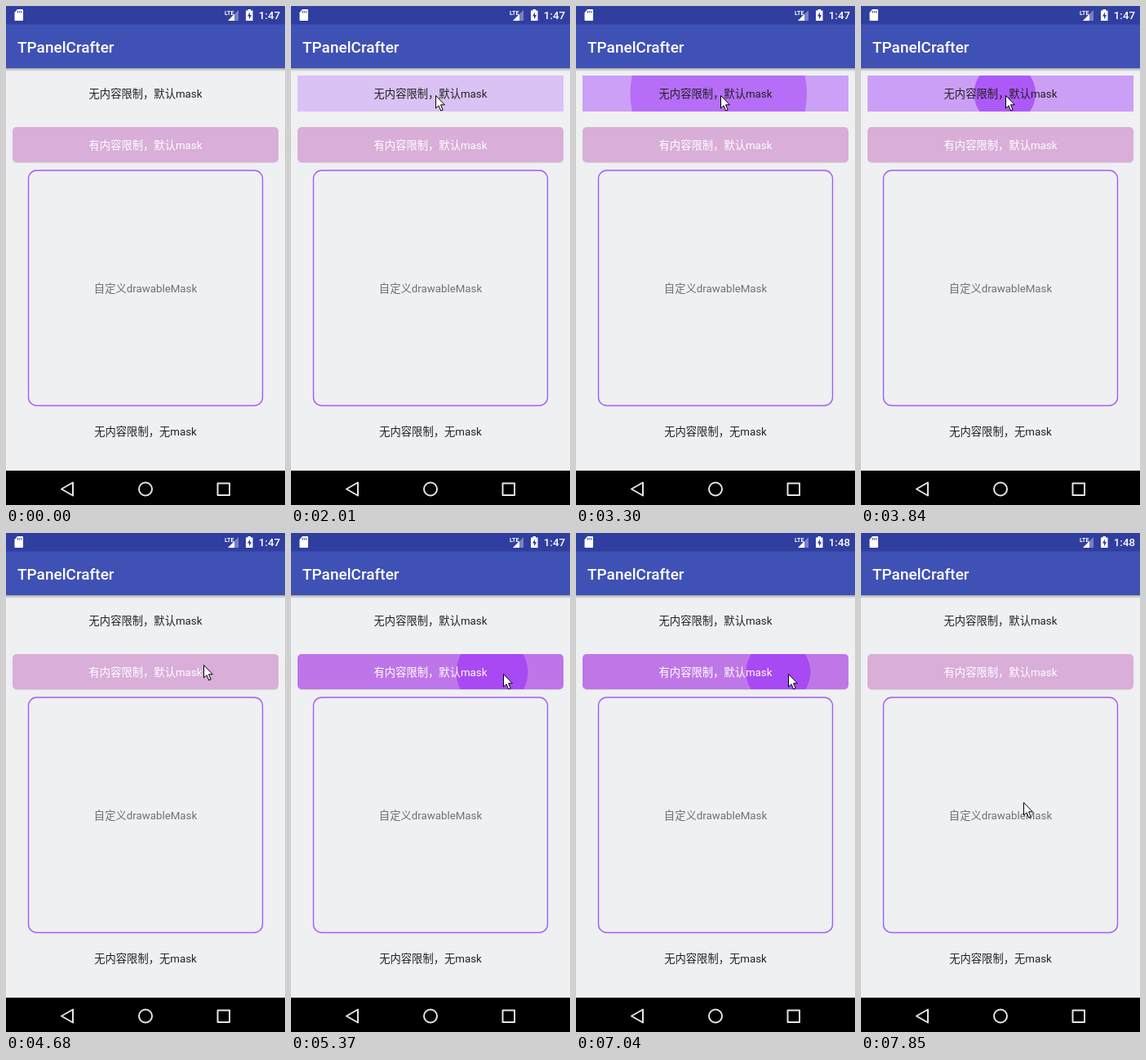
Recreate the animation shown at these times as an HTML page. Size 342x610 px, loop 8000 ms.

```html
<!DOCTYPE html>
<html lang="zh-CN">
<head>
<meta charset="utf-8">
<style>
  html, body { margin: 0; width: 100%; height: 100%; overflow: hidden; background: #eef0f2; }
  svg { display: block; width: 342px; height: 610px; }
  text { font: 13.3px Roboto, "Noto Sans CJK SC", "Noto Sans CJK", sans-serif; }
  .label { text-anchor: middle; fill: #222; }
  .ripple { fill: #9b30fa; }
</style>
</head>
<body>
<svg viewBox="0 0 342 610">
  <defs>
    <linearGradient id="shade" x2="0" y2="1">
      <stop stop-color="#000" stop-opacity=".3"/>
      <stop offset="1" stop-color="#000" stop-opacity="0"/>
    </linearGradient>
    <clipPath id="clip0"><rect x="8" y="85" width="326" height="44"/></clipPath>
    <clipPath id="clip1"><rect x="8" y="148" width="326" height="43" rx="5"/></clipPath>
  </defs>

  <rect width="342" height="610" fill="#eef0f2"/>
  <rect y="76" width="342" height="4" fill="url(#shade)"/>
  <rect y="22" width="342" height="54" fill="#3f51b5"/>
  <rect width="342" height="22.5" fill="#303f9f"/>
  <text x="14" y="57" fill="#fff" style="font-size:19px;font-weight:500">TPanelCrafter</text>

  <!-- status bar -->
  <g fill="#fff">
    <path d="M14 4h6q1 0 1 1v12q0 1-1 1h-8.500q-1 0-1-1V8z"/>
    <path d="M14.500 6v2.500M16.700 6v2.500M18.900 6v2.500" stroke="#303f9f"/>
    <text x="268" y="10.500" style="font-size:7px;font-weight:700" textLength="">LTE</text>
    <path d="M285 5v13h-13z" opacity=".35"/>
    <path d="M280 10v8h-8z"/>
    <path d="M296.500 5.500V4h3.500v1.500h2.500V18h-8.500V5.500z"/>
    <path d="M299 7.500l-3 5h2v4l3-5.500h-2z" fill="#303f9f"/>
    <text id="clock" x="336" y="16" text-anchor="end" style="font-weight:500">1:47</text>
  </g>

  <!-- rows -->
  <g class="ripple" clip-path="url(#clip0)">
    <rect x="8" y="85" width="326" height="44"/><circle cy="107"/>
  </g>
  <text class="label" x="171" y="112">无内容限制，默认mask</text>

  <rect x="8" y="149" width="326" height="43" rx="5" opacity=".1"/>
  <rect x="8" y="148" width="326" height="43" rx="5" fill="#d9aed9"/>
  <g class="ripple" clip-path="url(#clip1)">
    <rect x="8" y="148" width="326" height="43"/><circle cy="170"/>
  </g>
  <text class="label" x="171" y="174.500" style="fill:#fff">有内容限制，默认mask</text>

  <rect x="27.500" y="201" width="287" height="287.500" rx="10" fill="none" stroke="#a55cf5" stroke-width="1.400"/>
  <text class="label" x="171" y="350" style="fill:#6f7072">自定义drawableMask</text>
  <text class="label" x="171" y="525">无内容限制，无mask</text>

  <!-- navigation bar -->
  <rect y="568" width="342" height="42"/>
  <g fill="none" stroke="#e4e4e4" stroke-width="2" stroke-linejoin="round">
    <path d="M82 582.500v16l-14-8z"/>
    <circle cx="171" cy="590.500" r="8"/>
    <rect x="259.500" y="583.500" width="14.500" height="14.500"/>
  </g>

  <path id="cursor" d="M.5 .5V16L4 12.800 6.700 19 9.200 18 6.500 11.800H11.300Z" fill="#fff" stroke="#000"/>
</svg>
<script>
const LOOP = 8000;
// Bursts of screen updates: first tick, last tick, number of ticks
const bursts = [
  [560, 1520, 8], [1890, 2570, 6], [3030, 3540, 5], [3840, 4680, 7],
  [5070, 5800, 6], [6100, 7040, 7], [7190, 7850, 6]
];
const taps = [
  { row: 0, x: 177, down: 1886, up: 2180, visible: 1890 },
  { row: 0, x: 177, down: 2950, up: 3190, visible: 3030 },
  { row: 0, x: 177, down: 3595, up: 3980, visible: 3840 },
  { row: 1, x: 260, down: 5100, up: 5420, visible: 5200 },
  { row: 1, x: 260, down: 5907, up: 6300, visible: 6100 },
  { row: 1, x: 260, down: 6790, up: 7080, visible: 6870 }
];
// Pointer moves: start, end, from, to
const moves = [
  [560, 1520, [330, 573], [177, 109]],
  [4260, 4680, [177, 109], [242, 161]],
  [5000, 5070, [242, 161], [260, 172]],
  [7454, 7850, [260, 172], [199, 329]]
];
const FADE = 350, DELAY = 140, STRENGTH = .62;

const clock = document.getElementById('clock');
const cursor = document.getElementById('cursor');
const ripples = [...document.querySelectorAll('.ripple')];
const clamp = v => Math.min(1, Math.max(0, v));
const ease = p => (1 - Math.cos(Math.PI * p)) / 2;

function snap(t) {
  const burst = bursts.filter(b => t >= b[0]).pop();
  if (!burst) return 0;
  const [start, end, count] = burst;
  const step = (end - start) / (count - 1);
  return Math.min(end, start + Math.floor((t - start + 16) / step) * step);
}

function drawRipple(group, row, t) {
  const tap = taps.find(p => p.row === row && t >= p.visible && t < p.up + FADE);
  group.style.display = tap ? '' : 'none';
  if (!tap) return;
  const age = t - tap.down;
  const released = Math.max(0, t - tap.up);
  const fade = 1 - released / FADE;
  const radius = Math.max(0, age - DELAY) * .36 + released * .4;
  const [back, circle] = group.children;
  back.setAttribute('opacity', STRENGTH * clamp(age / 360) * fade);
  circle.setAttribute('opacity', STRENGTH * fade);
  circle.setAttribute('r', radius);
  circle.setAttribute('cx', tap.x + (171 - tap.x) * clamp(radius / 290));
}

function drawCursor(t) {
  const move = moves.filter(m => t >= m[0]).pop();
  cursor.style.display = move ? '' : 'none';
  if (!move) return;
  const [start, end, from, to] = move;
  const p = ease(clamp((t - start) / (end - start)));
  const [x, y] = from.map((v, i) => Math.round(v + (to[i] - v) * p));
  cursor.setAttribute('transform', `translate(${x} ${y})`);
}

const origin = performance.now();
function draw() {
  const t = snap((performance.now() - origin) % LOOP);
  ripples.forEach((group, row) => drawRipple(group, row, t));
  drawCursor(t);
  clock.textContent = t < 6700 ? '1:47' : '1:48';
  requestAnimationFrame(draw);
}
draw();
</script>
</body>
</html>
```
